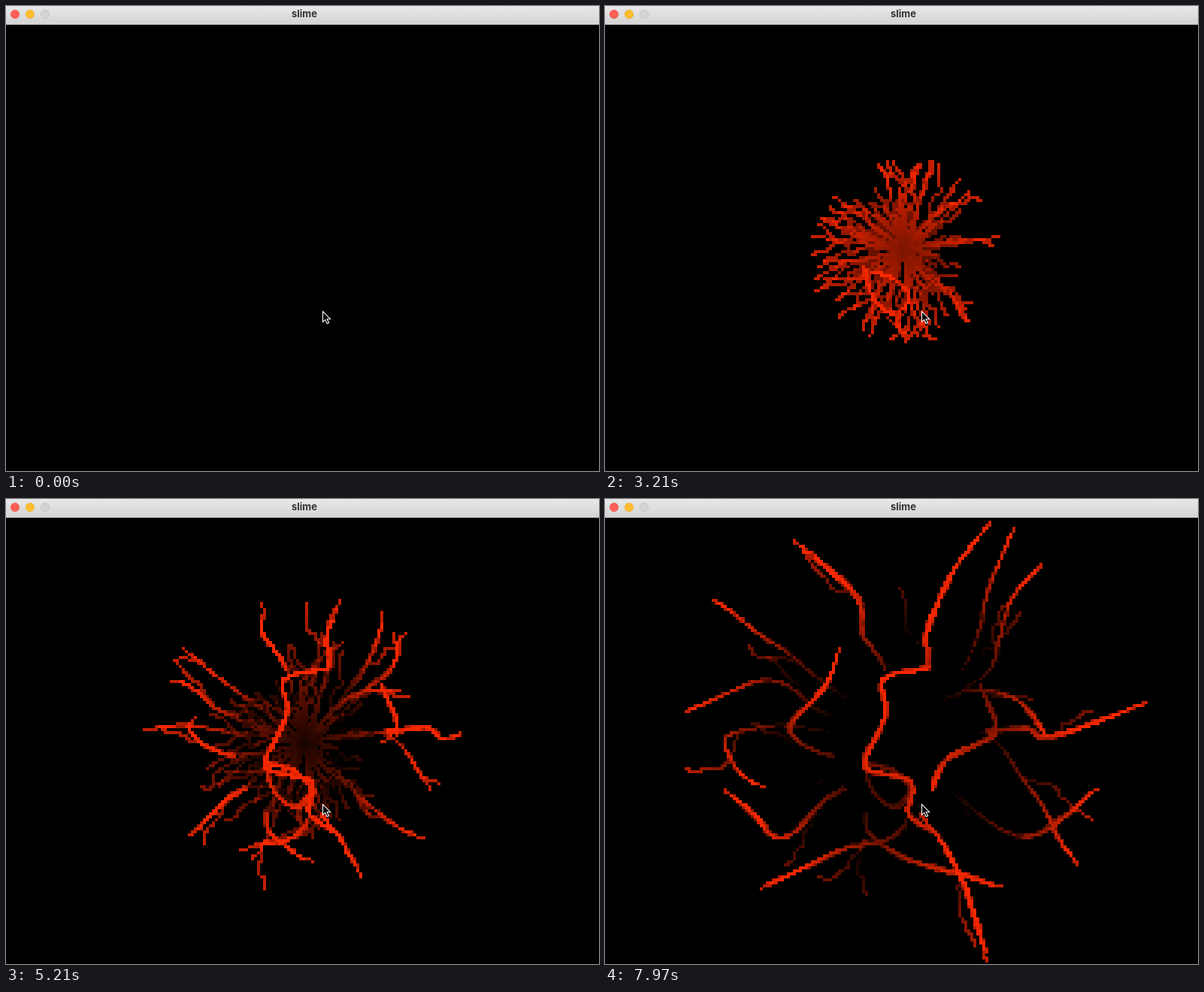
An HTML page with a canvas for the animation above (8 s loop, 789x619 px).

```html
<!DOCTYPE html>
<html lang="en">
<head>
<meta charset="utf-8">
<title>slime</title>
<style>
  html, body { margin: 0; width: 100%; height: 100%; overflow: hidden; background: #000; }
  canvas, svg { position: absolute; left: 0; top: 0; display: block; }
  text { font: 700 13px Inter, sans-serif; fill: #333; text-anchor: middle; }
</style>
</head>
<body>
<canvas width="789" height="619"></canvas>
<svg width="789" height="619">
  <linearGradient id="bar" x2="0" y2="1">
    <stop stop-color="#e8e8e8"/>
    <stop offset="1" stop-color="#d3d3d3"/>
  </linearGradient>
  <rect width="789" height="25" fill="url(#bar)"/>
  <rect y="24" width="789" height="1" fill="#c4c4c4"/>
  <circle cx="12" cy="11" r="5.75" fill="#ff5f57" stroke="#e2463f" stroke-width=".5"/>
  <circle cx="32" cy="11" r="5.75" fill="#febc2e" stroke="#e1a116" stroke-width=".5"/>
  <circle cx="52" cy="11" r="5.75" fill="#d4d4d4" stroke="#c0c0c0" stroke-width=".7"/>
  <text x="397" y="15">slime</text>
  <path d="M421.5 406.5V420.6L424.7 417.6L427.2 422.8L429.6 421.7L427.2 416.7H431.6Z"
        fill="#000" stroke="#fff" stroke-width="1.1"/>
</svg>
<script>
const LOOP = 8000, START = 500, STEP_MS = 90, STEPS = 84;
const CELL = 4, LEFT = 2, TOP = 25, COLS = 197, ROWS = 149;
const CENTER = [398, 325], DEPOSIT = 200, DECAY = 4.5;
const ctx = document.querySelector('canvas').getContext('2d');

let seed = 11;
function random() {
  seed = (seed * 16807) % 2147483647;
  return seed / 2147483647;
}

// Cells touched by a walker, grouped by growth step.
const deposits = Array.from({ length: STEPS }, () => []);

// Catmull-Rom curve through the key points, as points about 2 px apart.
function curve(keys) {
  const dense = [];
  keys.slice(1).forEach((p2, i) => {
    const p1 = keys[i], p0 = keys[i - 1] || p1, p3 = keys[i + 2] || p2;
    const count = Math.ceil(Math.hypot(p2[0] - p1[0], p2[1] - p1[1]) / 2);
    for (let k = 0; k < count; k++) {
      const t = k / count;
      dense.push([0, 1].map(a => p1[a] + t / 2 * (p2[a] - p0[a]
        + t * (2 * p0[a] - 5 * p1[a] + 4 * p2[a] - p3[a]
        + t * (3 * (p1[a] - p2[a]) + p3[a] - p0[a])))));
    }
  });
  return dense;
}

function walk(points, start, end, { delay = 0, sway = 0, skip = 0 } = {}) {
  const phase = random() * 6.28;
  let last = -1;
  points.forEach(([x, y], k) => {
    const progress = k / points.length;
    const step = Math.floor(start + (end - start) * progress + delay);
    const col = Math.floor((x + sway * Math.sin(k / 7 + phase) - LEFT) / CELL);
    const row = Math.floor((y + sway * Math.cos(k / 9 + phase) - TOP) / CELL);
    const cell = row * COLS + col;
    if (progress < skip || step >= STEPS || row < 0 || row >= ROWS || cell === last) return;
    deposits[step].push(cell);
    last = cell;
  });
}

// A leader draws the path; followers keep it bright for `traffic` more steps.
function vein(points, start, end, traffic, skip = 0) {
  walk(points, start, end, { sway: 1 });
  for (let delay = 4; delay <= traffic; delay += 4)
    walk(points, start, end, { delay, sway: 2, skip });
}

// A crooked path that keeps its heading for `straight` px, then curls.
function wander([x, y], heading, length, straight, curl) {
  const keys = [[x, y]];
  for (let d = 0; d < length; d += 12) {
    if (d > straight) heading += curl;
    const way = heading + (random() - 0.5) * (d < straight ? 0.3 : 1.2);
    keys.push([x += 12 * Math.cos(way), y += 12 * Math.sin(way)]);
  }
  return curve(keys);
}

const parse = path => path.split(' ').map(p => p.split(',').map(Number));

// An arm grows from the centre to the end and throws off one curling twig.
function arm(path, traffic = 6) {
  const points = curve([CENTER, ...parse(path)]);
  vein(points, 0, STEPS, traffic, 0.32);
  const at = 0.4 + 0.3 * random(), k = Math.floor(points.length * at);
  const [x, y] = points[k], [x0, y0] = points[k - 4];
  const side = random() < 0.5 ? -1 : 1;
  const length = 60 + 50 * random();
  const twig = wander([x, y], Math.atan2(y - y0, x - x0) + side * 0.7, length, 0, -side * 0.12);
  walk(twig, STEPS * at, STEPS * at + length / CELL);
}

// Dense burst of short runners; the east side stays sparse.
const RAYS = 100;
for (let i = 0; i < RAYS; i++) {
  const angle = (i + random()) / RAYS * 2 * Math.PI;
  const reach = (30 + 125 * random() ** 1.2) * (Math.cos(angle) > 0.75 ? 0.6 : 1);
  const points = wander(CENTER, angle, reach, 40, (random() - 0.5) * 0.3);
  walk(points, 0, reach / CELL);
}

arm('430,222 428,178 464,96 513,31', 40);
arm('445,266 488,205 512,116 544,39');
arm('470,262 518,215 537,140 580,87');
arm('372,225 342,179 335,130 252,55', 20);
arm('258,218 207,179 143,135');
arm('290,285 222,241 108,282');
arm('243,303 165,315 172,358 212,383');
arm('300,340 246,305 295,247 312,198', 16);
arm('306,392 238,449 196,420 157,387', 16);
arm('346,420 375,465 430,488 528,515', 12);
arm('400,435 316,467 207,518', 12);
arm('408,400 450,460 482,525 508,615', 40);
arm('503,313 568,390 628,490');
arm('440,370 556,450 655,385');
arm('552,305 592,317 720,271', 26);
arm('470,258 540,264 590,316');

// Busy links between the arms: a ring below the centre, the spine, an eastern arc.
vein(curve(parse('345,350 358,390 385,410 406,390 385,363 345,350')), 20, 32, 20);
vein(curve(parse('440,445 405,420 405,375 345,356 373,290 370,240 430,225')), 30, 46, 40);
vein(curve(parse('500,250 518,310 455,347 435,385')), 36, 70, 12);

const stepAt = t => Math.max(0, Math.min(STEPS, 1 + Math.floor((t - START) / STEP_MS)));

function draw(step) {
  const field = new Float32Array(COLS * ROWS);
  for (let s = 0; s < step; s++) {
    for (let c = 0; c < field.length; c++) field[c] = Math.max(0, field[c] - DECAY);
    for (const c of deposits[s]) field[c] = Math.min(255, field[c] + DEPOSIT);
  }
  ctx.fillStyle = '#000';
  ctx.fillRect(0, 0, 789, 619);
  field.forEach((v, c) => {
    if (v < 4) return;
    ctx.fillStyle = `rgb(${Math.round(v)},${Math.round(v * 0.16)},0)`;
    ctx.fillRect(LEFT + c % COLS * CELL, TOP + Math.floor(c / COLS) * CELL, CELL, CELL);
  });
}

let shown = -1;
const began = performance.now();
function frame() {
  const step = stepAt((performance.now() - began) % LOOP);
  if (step !== shown) draw(shown = step);
  requestAnimationFrame(frame);
}
frame();
</script>
</body>
</html>
```
